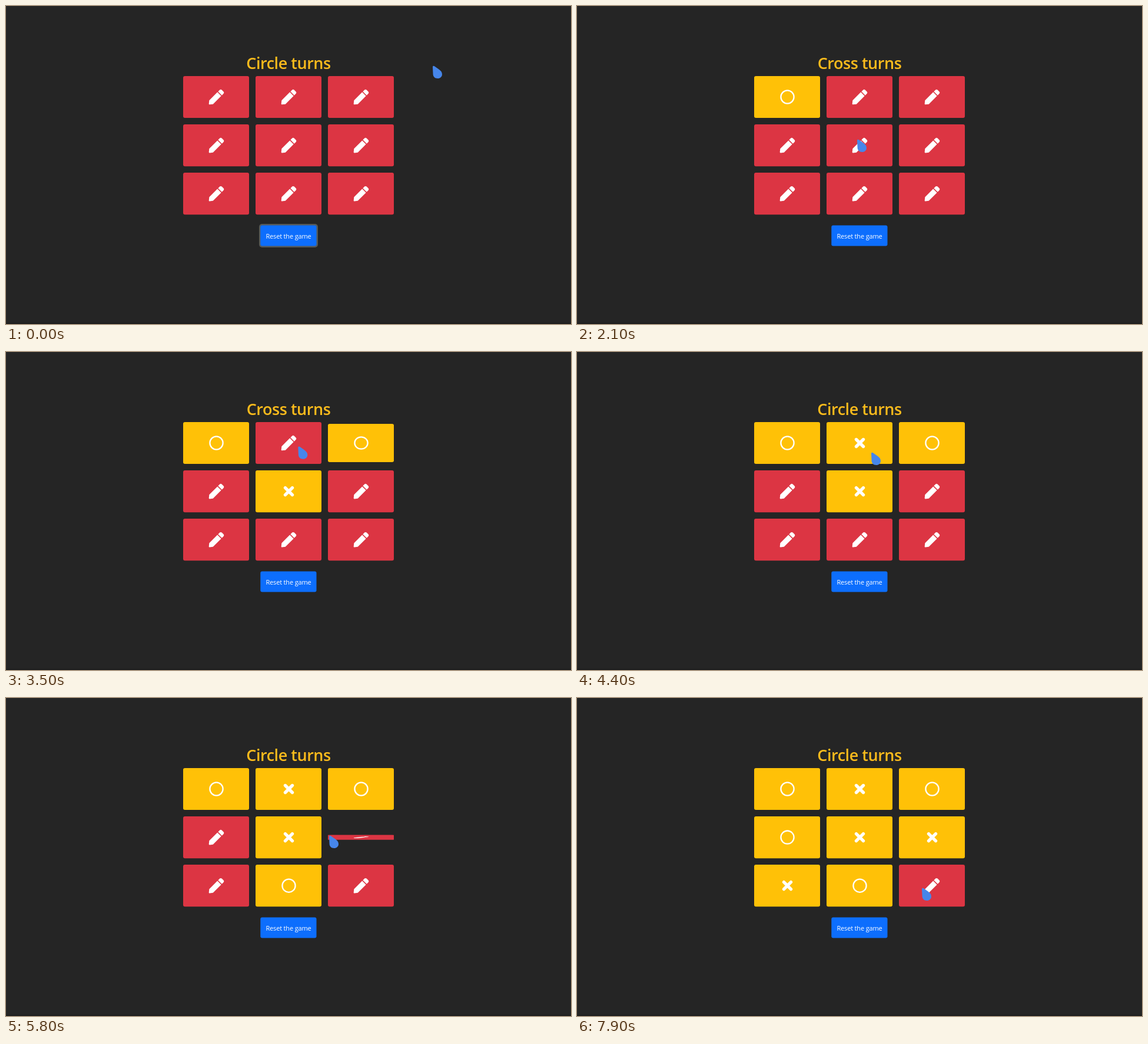
Recreate the animation shown at these times as an HTML page. Size 960 by 540 pixels, loop 8 s.

```html
<!DOCTYPE html>
<html lang="en">
<head>
<meta charset="utf-8">
<title>Noughts and crosses</title>
<style>
html, body { margin: 0; width: 100%; height: 100%; overflow: hidden; background: #252525; }
svg { display: block; width: 960px; height: 540px; }
text { font-family: "Open Sans", "Noto Sans", sans-serif; text-anchor: middle; }
#title { font-size: 27px; font-weight: 600; letter-spacing: -.45px; fill: #fbbb1c; }
#label { font-size: 11px; letter-spacing: -.15px; fill: #fff; }
</style>
</head>
<body>
<svg viewBox="0 0 960 540">
  <defs>
    <path id="pen" transform="scale(.05) translate(-256 -256)" fill="#fff" d="M290.74 93.24l128.02 128.02-277.99 277.99-114.14 12.6C11.35 513.54-1.56 500.62.14 485.34l12.7-114.22 277.9-277.88zm207.2-19.06l-60.11-60.11c-18.75-18.75-49.16-18.75-67.91 0l-56.55 56.55 128.02 128.02 56.55-56.55c18.75-18.76 18.75-49.16 0-67.91z"/>
    <circle id="circle" r="11.1" fill="none" stroke="#fff" stroke-width="2.3"/>
    <path id="cross" d="M-6-6L6 6M6-6L-6 6" stroke="#fff" stroke-width="5.4" stroke-linecap="round"/>
  </defs>
  <rect y="538" width="960" height="2" fill="#1d1d1d"/>
  <text id="title" x="480" y="107"></text>
  <g id="board"></g>
  <rect id="ring" x="430" y="370" width="100" height="40" rx="5" fill="#555a5a"/>
  <rect x="432.3" y="372.5" width="95.2" height="35" rx="3" fill="#0d6efd"/>
  <text id="label" x="480" y="394.7">Reset the game</text>
  <path id="cursor" fill="#4686ea" d="M0 1.6C0-.2 1.6-.7 3 .3L10.5 5.6C14 8.2 16 10.5 16 14C16 18.3 12.7 21 8.4 21C3.8 21 .9 18.2.6 14Z"/>
</svg>
<script>
const LOOP = 8000, STEP = 100, FLIP = 800;
const $ = id => document.getElementById(id);

// Moves in turn, circle first: [time, cell]
const moves = [[1000, 0], [2200, 4], [3040, 2], [3600, 1], [4900, 7], [5580, 5], [6330, 3], [7050, 6]];

// Pointer stops: [time, x, y]
const stops = [
  [0, 725, 102], [900, 360, 150], [1500, 362, 152], [2000, 476, 227], [2300, 476, 227],
  [2850, 590, 150], [3080, 590, 150], [3450, 496, 160], [3700, 499, 167], [4400, 500, 171],
  [4800, 475, 312], [5000, 475, 312], [5500, 549, 234], [5800, 549, 234], [6250, 378, 241],
  [6600, 391, 251], [6950, 355, 315], [7250, 355, 315], [7850, 586, 323], [8000, 586, 323]
];

const cells = Array.from({ length: 9 }, (_, i) => {
  const g = document.createElementNS("http://www.w3.org/2000/svg", "g");
  g.innerHTML = '<rect x="-56" y="-35.6" width="112" height="71.2" rx="3"/><use/>';
  $("board").append(g);
  return { g, x: 357 + i % 3 * 123, y: 154.5 + Math.floor(i / 3) * 82.1 };
});

// cubic-bezier(.25, .1, .25, 1)
function ease(x) {
  if (x <= 0 || x >= 1) return x <= 0 ? 0 : 1;
  let lo = 0, hi = 1, s;
  for (let i = 0; i < 20; i++) {
    s = (lo + hi) / 2;
    if (.75 * s * (1 - s) + s ** 3 < x) lo = s; else hi = s;
  }
  return .3 * s * (1 - s) ** 2 + 3 * s * s * (1 - s) + s ** 3;
}

function pointer(t) {
  const i = stops.findIndex(s => s[0] > t);
  const [t0, x0, y0] = stops[i - 1], [t1, x1, y1] = stops[i];
  const u = (t - t0) / (t1 - t0), k = u * u * (3 - 2 * u);
  return [x0 + (x1 - x0) * k, y0 + (y1 - y0) * k];
}

function draw(t) {
  const played = moves.filter(m => m[0] <= t).length;
  $("title").textContent = (played % 2 ? "Cross" : "Circle") + " turns";
  $("ring").style.display = played ? "none" : "";
  cells.forEach(({ g, x, y }, i) => {
    const n = moves.findIndex(m => m[1] === i);
    const turn = n < 0 ? 0 : ease((t - moves[n][0]) / FLIP);
    const back = turn > .5;
    g.setAttribute("transform", `translate(${x} ${y}) scale(1 ${Math.abs(Math.cos(turn * Math.PI))})`);
    g.firstChild.setAttribute("fill", back ? "#ffc107" : "#dc3543");
    g.lastChild.setAttribute("href", !back ? "#pen" : n % 2 ? "#cross" : "#circle");
    g.lastChild.setAttribute("x", .5);
  });
  $("cursor").setAttribute("transform", `translate(${pointer(t)})`);
}

const start = performance.now();
function tick() {
  const t = (performance.now() - start) % LOOP;
  draw(Math.floor(t / STEP) * STEP);
  requestAnimationFrame(tick);
}
tick();
</script>
</body>
</html>
```
